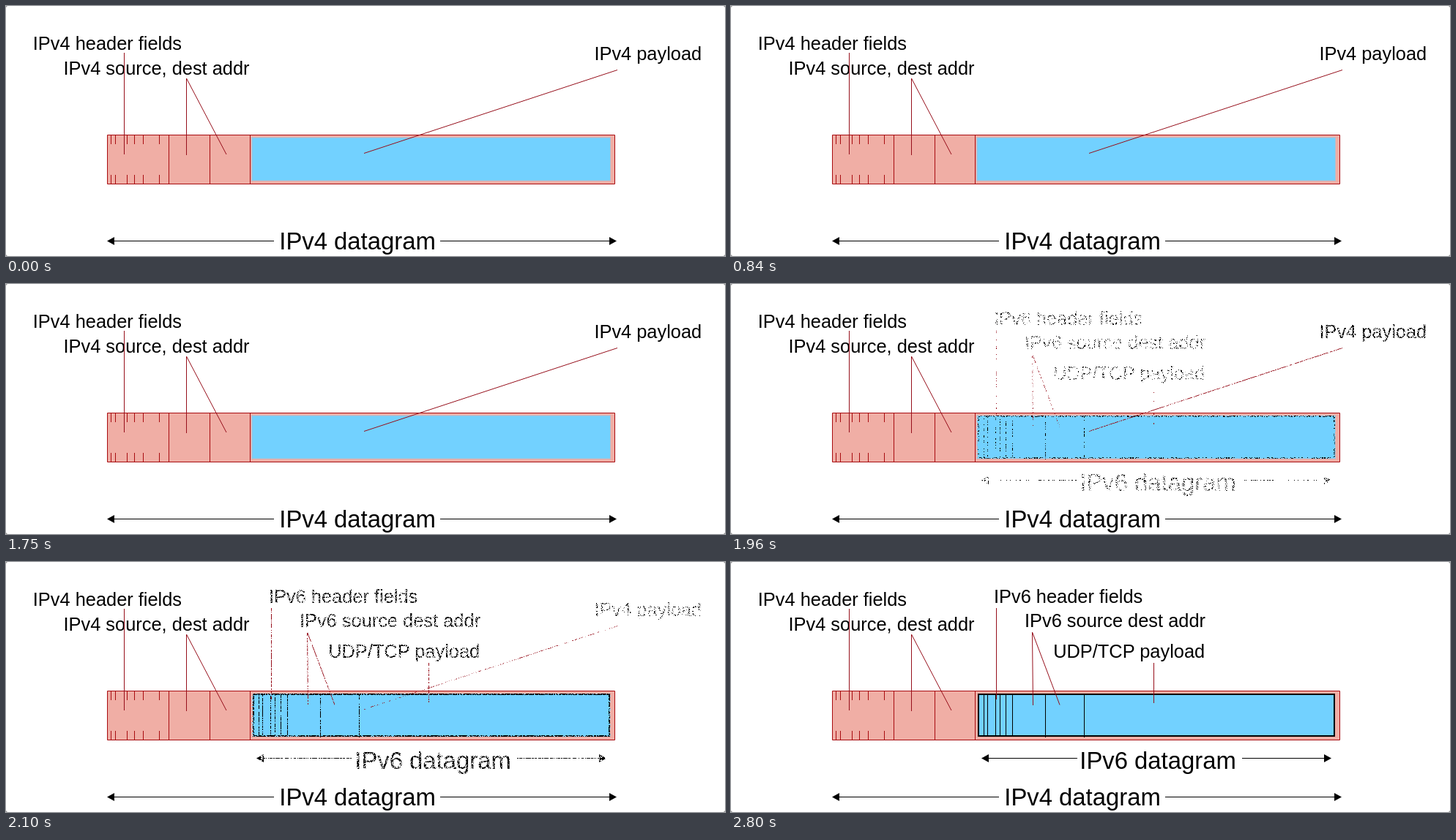
Recreate the animation shown at these times as an HTML page. Size 982 by 342 pixels, loop 3.08 s.

```html
<!DOCTYPE html>
<html lang="en">
<head>
<meta charset="utf-8">
<title>IPv6 in IPv4 datagram</title>
<style>
  html, body { margin: 0; width: 100%; height: 100%; overflow: hidden; background: #fff; }
  svg { display: block; width: 982px; height: 342px; }
  text { font: 25.4px "Liberation Sans", Arial, sans-serif; fill: #000; }
  .big { font-size: 32.85px; }
  .wire { fill: none; stroke: #960f1b; stroke-width: 1; }
  .edge { fill: none; stroke: #a80c10; stroke-width: 1; }
  .ink { fill: none; stroke: #000; stroke-width: 1; }
</style>
</head>
<body>
<svg viewBox="0 0 982 342">
  <defs>
    <pattern id="grainIn" width="131" height="113" patternUnits="userSpaceOnUse">
      <path id="dotsIn" fill="#fff" shape-rendering="crispEdges"/>
    </pattern>
    <pattern id="grainOut" width="131" height="113" patternUnits="userSpaceOnUse">
      <path id="dotsOut" fill="#fff" shape-rendering="crispEdges"/>
    </pattern>
    <mask id="maskIn" maskUnits="userSpaceOnUse" x="0" y="0" width="982" height="342">
      <rect width="982" height="342" fill="url(#grainIn)"/>
    </mask>
    <mask id="maskOut" maskUnits="userSpaceOnUse" x="0" y="0" width="982" height="342">
      <rect width="982" height="342" fill="url(#grainOut)"/>
    </mask>
  </defs>

  <!-- stage corners -->
  <path fill="#999" d="M0 0h2l-2 2zM982 0v2l-2 -2zM0 342v-2l2 2zM982 342h-2l2 -2z"/>

  <!-- outer datagram -->
  <rect x="138.5" y="176.5" width="693" height="67" fill="#f0aea5"/>
  <rect x="338" y="181" width="486" height="57" fill="#72d1ff"/>
  <path class="edge" d="M138.5 176.5H831.5V243.5H138.5ZM222.5 177V243M278.5 177V243M333.5 177V243"/>
  <path class="edge" id="ticks"/>
  <text x="36.8" y="60">IPv4 header fields</text>
  <text x="78.5" y="93.5">IPv4 source, dest addr</text>
  <path class="wire" d="M161.5 64V203M246.5 204V99L301 203"/>
  <text class="big" x="373.3" y="332.5">IPv4 datagram</text>
  <path class="ink" d="M146 321.5H366M593 321.5H826"/>
  <path d="M138 321.5l10 -5.5v11zM834 321.5l-10 -5.5v11z"/>

  <!-- plain payload -->
  <g id="plain">
    <rect x="336" y="180.5" width="489" height="58" fill="none" stroke="#b4bfd0" stroke-width="2"/>
    <rect x="337.5" y="181.5" width="486.5" height="56" fill="none" stroke="#72d1ff" stroke-width="2"/>
    <text x="803.4" y="74.2">IPv4 payload</text>
    <path class="wire" d="M835 87.5L489 201.5"/>
  </g>

  <!-- inner datagram -->
  <g id="inner">
    <rect x="338" y="181" width="486" height="57" fill="none" stroke="#000" stroke-width="2"/>
    <path class="ink" id="fields"/>
    <text x="359" y="55.5">IPv6 header fields</text>
    <text x="401" y="89">IPv6 source dest addr</text>
    <text x="440.2" y="130.5">UDP/TCP payload</text>
    <path class="wire" d="M362.5 63V188M412.5 196L411.5 96L449 195.5M577.5 138V193"/>
    <text class="big" x="476.3" y="282.5">IPv6 datagram</text>
    <path class="ink" d="M350 268.5H473M698 268.5H812"/>
    <path d="M342 268.5l10 -5.5v11zM820 268.5l-10 -5.5v11z"/>
  </g>
</svg>
<script>
  const LOOP = 3080, STEP = 70, FADE_START = 1800, FADE_TIME = 470;
  const TILE_W = 131, TILE_H = 113;
  const el = id => document.getElementById(id);

  el('ticks').setAttribute('d', [143, 149, 165, 175, 187, 209]
    .map(x => `M${x + 0.5} 177V189M${x + 0.5} 231V243`).join(''));
  el('fields').setAttribute('d', [345, 350, 361, 367, 375, 384, 429, 482]
    .map(x => `M${x + 0.5} 182V${x > 400 ? 240 : 238}`).join(''));

  // Seeded noise: each cell switches once the progress passes its value
  let seed = 4821;
  const random = () => {
    seed = (Math.imul(seed, 1664525) + 1013904223) >>> 0;
    return seed / 4294967296;
  };
  const noise = Array.from({ length: TILE_W * TILE_H }, random);

  function dissolve(p) {
    const mixing = p > 0 && p < 1;
    el('plain').style.display = p < 1 ? '' : 'none';
    el('inner').style.display = p > 0 ? '' : 'none';
    if (mixing) {
      let on = '', off = '';
      noise.forEach((v, i) => {
        const cell = `M${i % TILE_W} ${Math.floor(i / TILE_W)}h1v1h-1z`;
        if (v < p) on += cell; else off += cell;
      });
      el('dotsIn').setAttribute('d', on);
      el('dotsOut').setAttribute('d', off);
      el('inner').setAttribute('mask', 'url(#maskIn)');
      el('plain').setAttribute('mask', 'url(#maskOut)');
    } else {
      el('inner').removeAttribute('mask');
      el('plain').removeAttribute('mask');
    }
  }

  let shown = -1;
  function draw() {
    const t = Math.floor((performance.now() % LOOP) / STEP) * STEP;
    const u = Math.min(1, Math.max(0, (t - FADE_START) / FADE_TIME));
    const p = u * u * (3 - 2 * u);
    if (p !== shown) dissolve(shown = p);
    requestAnimationFrame(draw);
  }
  draw();
</script>
</body>
</html>
```
